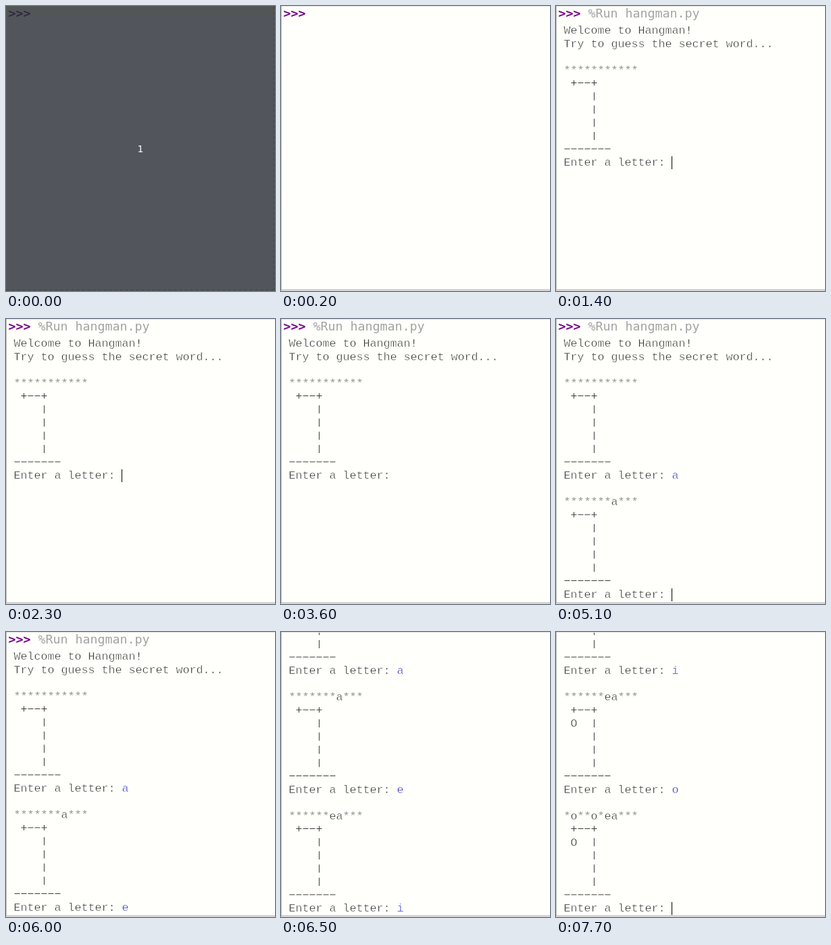
Animation, 398 px wide and 421 px high, one loop 8 s. Source, as an HTML page:

```html
<!DOCTYPE html>
<html lang="en">
<head>
<meta charset="utf-8">
<title>Hangman in a shell</title>
<style>
html, body { margin: 0; width: 100%; height: 100%; overflow: hidden; background: #fffffb; }
svg { display: block; width: 398px; height: 421px; }
text { white-space: pre; }
/* The paper-coloured outline thins the letters */
.out { font: 16.67px "Liberation Mono", monospace; fill: #3a3a3a; stroke: #fffffb; stroke-width: .45px; }
.in { fill: #3c3ccc; }
.gallows { fill: none; stroke: #40383a; }
.shell { font: 18.27px "DejaVu Sans Mono", monospace; }
.prompt { font-weight: bold; }
</style>
</head>
<body>
<svg id="stage" viewBox="0 0 398 421">
  <rect width="398" height="421" fill="#fffffb"/>
  <g id="page">
    <text class="shell prompt" x="3.5" y="17" fill="#74008a">&gt;&gt;&gt;</text>
    <text class="shell" id="run" x="47.5" y="17" fill="#a3a3a3">%Run hangman.py</text>
  </g>
  <rect id="caret" width="1" height="19" fill="#000"/>
  <path d="M0 .5H398" stroke="#e4e6e2"/>
  <path d="M.5 0V420" stroke="#b6b6b4"/>
  <path d="M0 419.5H398" stroke="#b4b5b0" stroke-width="1.6"/>
  <g id="count">
    <rect width="398" height="421" fill="#52555c"/>
    <rect width="398" height="14" fill="#535657"/>
    <path d="M0 419.5H398M396.5 0V420" stroke="#3f4648" stroke-dasharray="5 3"/>
    <text class="shell prompt" x="3.5" y="17" fill="#2f2a42">&gt;&gt;&gt;</text>
    <text x="199" y="216" text-anchor="middle" font-family="DejaVu Sans, sans-serif" font-size="14" fill="#fff">1</text>
  </g>
</svg>
<script>
const LOOP = 8000, PITCH = 19.5, LEFT = 11.5, CHAR = 10;
const $ = id => document.getElementById(id);
const page = $("page"), caret = $("caret");

// Each guess: when its board appears, when its letter is typed, and the scroll then
const rounds = [
  { at: 900, typed: 4200, word: "***********", key: "a", scroll: 0 },
  { at: 4400, typed: 5800, word: "*******a***", key: "e", scroll: 0 },
  { at: 6200, typed: 6500, word: "******ea***", key: "i", scroll: 174 },
  { at: 6900, typed: 7300, word: "******ea***", key: "o", scroll: 349.5, head: true },
  { at: 7600, typed: LOOP, word: "*o**o*ea***", key: "", scroll: 525, head: true }
];

// Times at which the caret is hidden
const hidden = [[0, 1000], [1600, 1900], [2500, 2800], [3400, 3700],
  [4700, 5000], [5500, 6100], [6500, 6800], [7000, 7200], [7300, 7500]];

const baseline = row => 41 + row * PITCH;

function add(parent, tag, attrs) {
  const el = document.createElementNS("http://www.w3.org/2000/svg", tag);
  for (const k in attrs) el.setAttribute(k, attrs[k]);
  return parent.appendChild(el);
}

function print(parent, row, str, col = 0, cls = "out") {
  const t = add(parent, "text", { class: cls, x: LEFT + col * CHAR, y: baseline(row) });
  t.textContent = str;
  return t;
}

function dash(row, col) {
  return `M${LEFT + col * CHAR + 1} ${baseline(row) - 5.5}h8`;
}

function bar(row, col, up, down) {
  return `M${LEFT + (col + 0.5) * CHAR} ${baseline(row) - up}V${baseline(row) + down}`;
}

// " +--+" on top, four "|" below it and a row of "-" at the foot
function drawGallows(parent, row) {
  let d = bar(row, 1, 9.5, -1.5) + bar(row, 4, 9.5, -1.5);
  for (let c = 1; c < 5; c++) d += dash(row, c);
  for (let n = 1; n < 5; n++) d += bar(row + n, 4, 11, 1);
  for (let c = 0; c < 7; c++) d += dash(row + 5, c);
  add(parent, "path", { class: "gallows", d });
}

function show(el, on) {
  el.setAttribute("visibility", on ? "visible" : "hidden");
}

rounds.forEach((r, i) => {
  const top = 3 + i * 9;
  r.row = top + 7;
  r.board = add(page, "g");
  if (i === 0) {
    print(r.board, 0, "Welcome to Hangman!");
    print(r.board, 1, "Try to guess the secret word...");
  }
  print(r.board, top, r.word);
  drawGallows(r.board, top + 1);
  if (r.head) print(r.board, top + 2, "O", 1);
  print(r.board, r.row, "Enter a letter: ");
  r.input = print(page, r.row, r.key, 16, "out in");
});

function draw(t) {
  show($("count"), t < 200);
  show($("run"), t >= 700);
  let now = rounds[0];
  for (const r of rounds) {
    show(r.board, t >= r.at);
    show(r.input, t >= r.typed);
    if (t >= r.at) now = r;
  }
  page.setAttribute("transform", `translate(0 ${-now.scroll})`);
  caret.setAttribute("x", LEFT + CHAR * (t >= now.typed ? 17 : 16) - 0.5);
  caret.setAttribute("y", Math.round(baseline(now.row) - 14 - now.scroll));
  show(caret, !hidden.some(([a, b]) => t >= a && t < b));
}

const start = performance.now();
function tick() {
  draw((performance.now() - start) % LOOP);
  requestAnimationFrame(tick);
}
tick();
</script>
</body>
</html>
```
